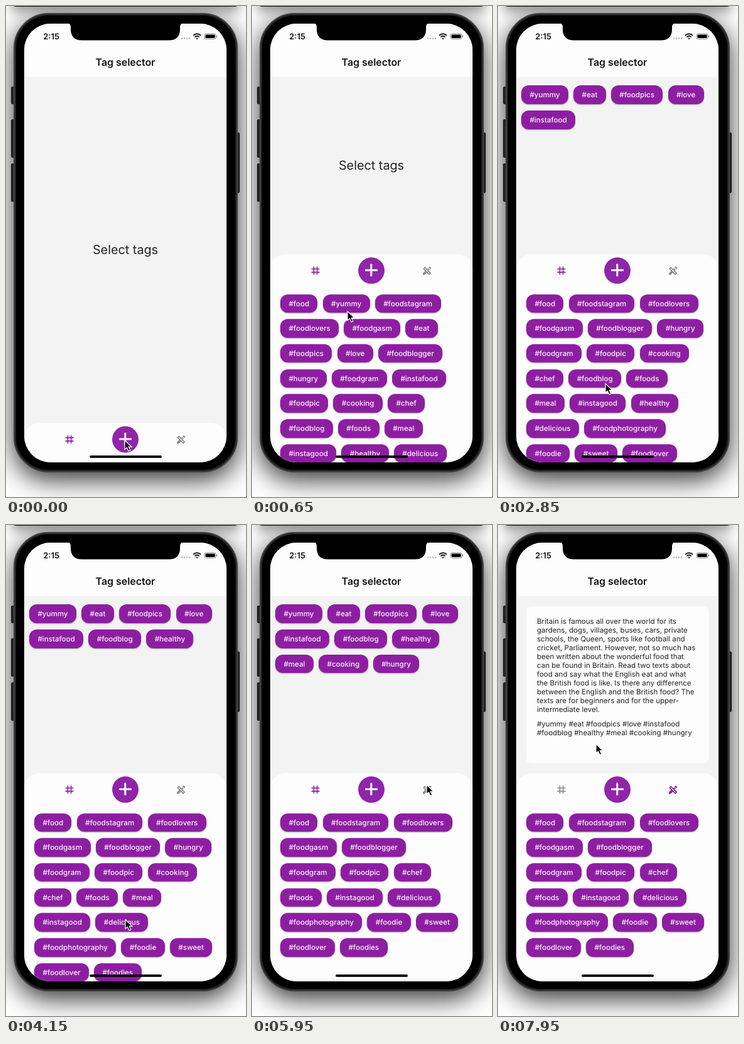
An HTML page that plays this animation: 382x780 px, repeating every 8 s.

```html
<!DOCTYPE html>
<html lang="en">
<head>
<meta charset="utf-8">
<title>Tag selector</title>
<style>
  html, body { margin: 0; width: 100%; height: 100%; overflow: hidden; background: #fff; }
  body { font-family: Inter, Roboto, sans-serif; color: #111; text-rendering: geometricPrecision; }
  div, svg, i { position: absolute; box-sizing: border-box; }
  #stage { left: 0; top: 0; width: 382px; height: 780px; overflow: hidden; background: #fff; }
  #window { left: 8px; top: -20px; width: 364px; height: 21px; border-radius: 8px; background: #0a0a0a; box-shadow: 0 8px 18px rgba(0,0,0,.4); }
  #phone { left: 12px; top: 11px; width: 357px; height: 730px; border-radius: 56px; background: #000;
    border: 2px solid #444; box-shadow: inset 0 0 0 2px #242424, 0 12px 40px rgba(0,0,0,.8); }
  .key { width: 5px; background: #3a3a3a; border-radius: 2px; border: 1px solid #2a2a2a; }
  #screen { left: 29px; top: 28px; width: 322px; height: 697px; border-radius: 42px; overflow: hidden; background: #f3f3f3; }
  #view { left: -29px; top: -28px; width: 382px; height: 780px; }
  #header { left: 29px; top: 28px; width: 322px; height: 85px; background: #fdfdfd; }
  .label { white-space: pre; transform: translate(-50%, -50%); line-height: 1; }
  #clock { left: 72px; top: 48.5px; font-size: 13px; font-weight: 600; }
  #title { left: 190px; top: 90px; font-size: 15.9px; font-weight: 600; }
  #empty { left: 190px; font-size: 19.8px; color: #222; }
  #card { left: 45px; top: 129px; width: 290px; height: 249px; border-radius: 8px; background: #fdfdfd;
    padding: 17px; font-size: 11.55px; line-height: 14px; white-space: pre; color: #222; }
  #card p { margin: 0 0 8.5px; }
  #panel { left: 29px; top: 0; width: 322px; height: 400px; border-radius: 24px 24px 0 0; background: #fdfdfd; }
  #panel .inner { left: -29px; top: 0; }
  .chip { height: 29.6px; padding: 0 13.4px; border-radius: 12px; background: #8d1ea2; color: #fbf4fc; isolation: isolate;
    font-size: 11.6px; font-weight: 500; line-height: 30.6px; white-space: pre; box-shadow: 0 1px 2px rgba(0,0,0,.32); }
  .chip i { z-index: -1; inset: 0 4.5px; border-radius: 5px; opacity: 0;
    background: linear-gradient(#ffffff40, #ffffff40) 16px 100% / 27px 10px no-repeat #fff; }
  #fab { left: 169px; top: 4.5px; width: 42px; height: 42px; border-radius: 50%; background: #8f25a8; }
  #fab::before, #fab::after { content: ""; position: absolute; left: 11px; top: 19.7px; width: 20px; height: 2.6px; border-radius: 1px; background: #fff; }
  #fab::after { transform: rotate(90deg); }
  #home { left: 133px; top: 714px; width: 114.5px; height: 4px; border-radius: 2px; background: #000; opacity: .92; }
</style>
</head>
<body>
<div id="stage">
  <div id="window"></div>
  <div class="key" style="left:8px;top:128px;height:28px"></div>
  <div class="key" style="left:8px;top:180px;height:61px"></div>
  <div class="key" style="left:8px;top:250px;height:61px"></div>
  <div class="key" style="left:367px;top:201px;height:96px"></div>
  <div id="phone"></div>
  <div id="screen"><div id="view">
    <div id="empty" class="label">Select tags</div>
    <div id="picked"></div>
    <div id="card"><p>Britain is famous all over the world for its
gardens, dogs, villages, buses, cars, private
schools, the Queen, sports like football and
cricket, Parliament. However, not so much has
been written about the wonderful food that
can be found in Britain. Read two texts about
food and say what the English eat and what
the British food is like. Is there any difference
between the English and the British food? The
texts are for beginners and for the upper-
intermediate level.</p><p>#yummy #eat #foodpics #love #instafood
#foodblog #healthy #meal #cooking #hungry</p></div>
    <div id="header"></div>
    <div id="title" class="label">Tag selector</div>
    <div id="clock" class="label">2:15</div>
    <div id="panel"><div class="inner">
      <svg id="hash" style="left:94px;top:18.5px" width="14" height="14" fill="none" stroke="currentColor" stroke-width="1.6">
        <path d="M4.4 .5v13M9.6 .5v13M.5 4.4h13M.5 9.6h13"/>
      </svg>
      <div id="fab"></div>
      <svg id="design" style="left:271px;top:18.5px" width="15" height="15" viewBox="0 0 15 15" fill="none" stroke="currentColor">
        <path d="M2.2 4.2 4.2 2.2 13 11 11 13Z" stroke-width="1.7"/>
        <path d="M5.2 6.4 6.8 4.8M8.2 9.6 9.8 8" stroke-width="1"/>
        <path d="M1 14v-2.7L5 7.3 7.7 10 3.7 14ZM8 4.3l2.7 2.7 1.2-1.2L9.2 3.1ZM10 2.3 12.7 5 14 3.7Q14.5 3 14 2.5L12.5 1Q12 .5 11.3 1Z" fill="currentColor" stroke="none"/>
      </svg>
      <div id="choices"></div>
    </div></div>
    <svg width="382" height="60" style="left:0;top:0">
      <path d="M98 27Q103 28 103 34V36.500Q103 54.500 121 54.500H259Q277 54.500 277 36.500V34Q277 28 282 27Z"/>
      <g fill="#b5b5b5"><circle cx="280" cy="51.500" r="1.300"/><circle cx="284" cy="51.500" r="1.300"/><circle cx="288" cy="51.500" r="1.300"/><circle cx="292" cy="51.500" r="1.300"/></g>
      <g fill="none" stroke="#111" stroke-width="1.900">
        <path d="M298 46.800Q304 41.500 310 46.800M300.300 49.400Q304 46 307.700 49.400"/>
        <path d="M302.500 51.200H305.500L304 52.800Z" stroke-width="1"/>
      </g>
      <rect x="316" y="44" width="18" height="8.500" rx="2.600" fill="none" stroke="#8a8a8a"/>
      <rect x="317.400" y="45.400" width="15.200" height="5.700" rx="1.400"/>
      <path d="M335.500 46.800v3" stroke="#8a8a8a" stroke-width="1.300"/>
    </svg>
    <div id="home"></div>
  </div></div>
  <svg id="cursor" style="left:-2px;top:-2px" width="17" height="23">
    <path d="M2 2V16.500L5.500 13.400 8 19.200 10.700 18 8.200 12.400H13Z" fill="#000" stroke="#fff" stroke-width="1.200"/>
  </svg>
</div>
<script>
const LOOP = 8000, ROW = 39.7, GAP = 8.2, PURPLE = '#8d1ea2', GRAY = '#8c8c8c';
const OPEN_AT = 80, OPEN_FOR = 480, SWITCH_AT = 6100;
const TAGS = ('food yummy foodstagram foodlovers foodgasm eat foodpics love foodblogger hungry foodgram instafood foodpic ' +
  'cooking chef foodblog foods meal instagood healthy delicious foodphotography foodie sweet foodlover foodies').split(' ');
const PICKS = [['yummy', 950], ['eat', 1220], ['foodpics', 1470], ['love', 1720], ['instafood', 2150],
  ['foodblog', 3050], ['healthy', 3750], ['meal', 4600], ['cooking', 5000], ['hungry', 5450]];
// time, x, y of the pointer tip
const POINTER = [[0, 189, 690], [150, 189, 690], [600, 152, 485], [960, 152, 485], [1160, 170, 514], [1720, 172, 515],
  [1850, 173, 550], [2250, 174, 552], [2700, 171, 600], [3150, 171, 600], [3600, 187, 627], [4150, 190, 627],
  [4500, 216, 592], [4650, 216, 592], [4900, 262, 552], [5050, 262, 552], [5350, 286, 514], [5500, 286, 514],
  [5850, 278, 413], [6400, 278, 413], [6950, 156, 348], [LOOP, 156, 348]];

const $ = id => document.getElementById(id);
const clamp = x => Math.min(1, Math.max(0, x));
const smooth = x => x * x * (3 - 2 * x);
const easeOut = x => 1 - (1 - x) ** 3;

function makeChip(tag, parent) {
  const el = document.createElement('div');
  el.className = 'chip';
  el.innerHTML = `<i></i>#${tag}`;
  parent.append(el);
  return { el, flash: el.firstChild, width: el.getBoundingClientRect().width };
}

function wrap(chips, left, top, right) {
  let x = left, y = top;
  return chips.map(chip => {
    if (x > left && x + chip.width > right) { x = left; y += ROW; }
    const spot = { chip, x, y };
    x += chip.width + GAP;
    return spot;
  });
}

function place({ chip, x, y }) {
  chip.el.style.left = x + 'px';
  chip.el.style.top = y + 'px';
}

const choices = Object.fromEntries(TAGS.map(tag => [tag, makeChip(tag, $('choices'))]));
const picked = PICKS.map(([tag]) => makeChip(tag, $('picked')));
wrap(picked, 37, 126.4, 343).forEach(place);

// stages[n] is the list of choices left after n picks
const stages = [TAGS];
PICKS.forEach(([tag], n) => stages.push(stages[n].filter(other => other !== tag)));
const layouts = stages.map(tags => wrap(tags.map(tag => choices[tag]), 45, 63.5, 335));
let shownStage = -1;

function showStage(n) {
  if (n === shownStage) return;
  shownStage = n;
  TAGS.forEach(tag => choices[tag].el.style.visibility = stages[n].includes(tag) ? 'inherit' : 'hidden');
  layouts[n].forEach(place);
  picked.forEach((chip, i) => chip.el.style.visibility = i < n ? 'inherit' : 'hidden');
}

// The pressed slot lights up; the next tag inherits the fading light.
function showPresses(t) {
  TAGS.forEach(tag => choices[tag].flash.style.opacity = 0);
  PICKS.forEach(([tag, time], n) => {
    const dt = t - time;
    if (dt < -80 || dt > 350) return;
    const slot = stages[n].indexOf(tag);
    const target = stages[dt < 0 ? n : n + 1][slot];
    choices[target].flash.style.opacity = .42 * (dt < 0 ? 1 + dt / 80 : 1 - dt / 350);
  });
}

function movePointer(t) {
  const i = POINTER.findIndex(step => step[0] > t);
  const [t0, x0, y0] = POINTER[i - 1], [t1, x1, y1] = POINTER[i];
  const k = smooth((t - t0) / (t1 - t0));
  $('cursor').style.transform = `translate(${x0 + (x1 - x0) * k}px, ${y0 + (y1 - y0) * k}px)`;
}

function render(t) {
  const top = 662.5 - 268.2 * easeOut(clamp((t - OPEN_AT) / OPEN_FOR));
  $('panel').style.transform = `translateY(${top}px)`;
  $('empty').style.top = (113 + top) / 2 + 'px';

  const count = PICKS.filter(([, time]) => time <= t).length;
  showStage(count);
  showPresses(t);
  $('empty').style.visibility = count ? 'hidden' : 'visible';

  const writing = t >= SWITCH_AT;
  $('picked').style.visibility = writing ? 'hidden' : 'visible';
  $('card').style.visibility = writing ? 'visible' : 'hidden';
  $('hash').style.color = writing ? GRAY : PURPLE;
  $('design').style.color = writing ? PURPLE : GRAY;
  movePointer(t);
}

const start = performance.now();
function tick() {
  render((performance.now() - start) % LOOP);
  requestAnimationFrame(tick);
}
tick();
</script>
</body>
</html>
```
